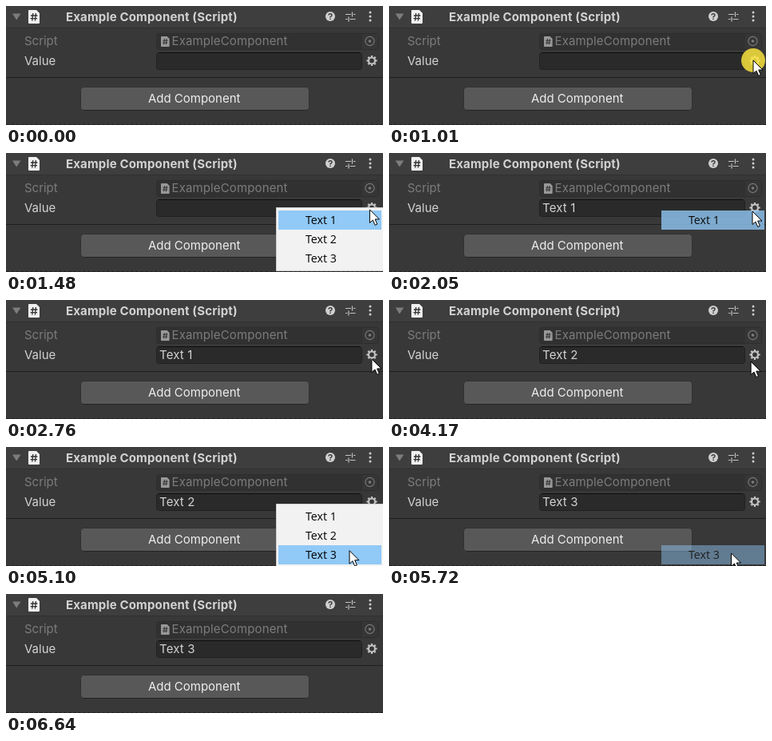
Recreate the animation shown at these times as an HTML page. Size 472 by 149 pixels, loop 7580 ms.

```html
<!DOCTYPE html>
<html lang="en">
<head>
<meta charset="utf-8">
<style>
  html, body { margin: 0; width: 100%; height: 100%; overflow: hidden; background: #383838; }
  svg { display: block; }
  text { font: 15px Inter, Roboto, sans-serif; fill: #d2d2d2; white-space: pre; }
  .title { font-weight: 700; letter-spacing: .16px; }
  .field { letter-spacing: .13px; }
  .dim { fill: #7c7c7c; }
  .button { fill: #eee; }
  #menu text { font: 14.2px "Open Sans", "Noto Sans", sans-serif; fill: #000; }
</style>
</head>
<body>
<svg width="472" height="149" viewBox="0 0 472 149">
  <defs>
    <g id="doc">
      <path d="M0 1Q0 0 1 0H10L14 4V16Q14 17 13 17H1Q0 17 0 16Z"/>
      <path d="M5.8 4L4.8 13.5M9.4 4L8.4 13.5M3 7H11.4M2.6 10.6H11" stroke="#303030" stroke-width="1.3"/>
    </g>
  </defs>

  <!-- header -->
  <rect width="472" height="149" fill="#383838"/>
  <rect width="472" height="27" fill="#3e3e3e"/>
  <path d="M0 27.5H472" stroke="#303030"/>
  <path d="M8 9.5H18.5L13.2 17.5Z" fill="#7d7d7d"/>
  <use href="#doc" x="28" y="5" fill="#f0f0f0"/>
  <text class="title" x="75" y="19">Example Component (Script)</text>
  <circle cx="406" cy="13" r="6" fill="#d0d0d0"/>
  <path d="M404 11.6Q404 9.7 406 9.7T408 11.4Q408 12.4 406 13.6V14.4M406 15.6V17" fill="none" stroke="#3e3e3e" stroke-width="1.5"/>
  <path d="M425 10.5H432M435 10.5H437.5M433.5 7.5V13.5M425 16.5H427.5M430.5 16.5H437.5M429 13.5V19.5" stroke="#c4c4c4" stroke-width="1.2"/>
  <path d="M456 8V18.5" stroke="#cfcfcf" stroke-width="3" stroke-linecap="round" stroke-dasharray="0 5"/>

  <!-- script row -->
  <text class="dim" x="23" y="49">Script</text>
  <rect x="188.5" y="34.5" width="278" height="20" rx="3" fill="#313131" stroke="#2d2d2d"/>
  <path d="M446 35H464Q466 35 466 37V52Q466 54 464 54H446Z" fill="#363636"/>
  <use href="#doc" transform="translate(194 38) scale(.76)" fill="#999"/>
  <text class="dim field" x="207.5" y="49">ExampleComponent</text>
  <circle cx="455.5" cy="44" r="5.6" fill="none" stroke="#7c7c7c" stroke-width="1.1"/>
  <circle cx="455.5" cy="44" r="1.8" fill="#7c7c7c"/>

  <!-- value row -->
  <text x="23" y="74">Value</text>
  <rect x="188.5" y="58.5" width="257" height="21" rx="3" fill="#2a2a2a" stroke="#212121"/>
  <path d="M191 58.5H443" stroke="#0d0d0d"/>
  <text id="value" class="field" x="192" y="74"></text>
  <g fill="none" stroke="#c4c4c4">
    <circle cx="458" cy="68.5" r="4" stroke-width="2.2"/>
    <circle cx="458" cy="68.5" r="5.5" stroke-width="2.2" pathLength="16" stroke-dasharray="1" stroke-dashoffset=".5"/>
  </g>

  <!-- footer -->
  <path d="M0 89.5H472" stroke="#1f1f1f"/>
  <rect x="93.5" y="101.5" width="286" height="29" rx="4" fill="#585858" stroke="#303030"/>
  <path d="M97 130.5H376" stroke="#242424"/>
  <text class="button" x="235.7" y="121" text-anchor="middle">Add Component</text>
  <path d="M0 148.5H472" stroke="#222" stroke-dasharray="4 2"/>

  <g id="menu">
    <rect id="panel" x=".5" y=".5" width="136" height="79" fill="#f2f2f2" stroke="#d0d0d0"/>
    <rect id="bar" x="3" width="129" height="24" fill="#91c9f7"/>
    <text x="37" y="21">Text 1</text>
    <text x="37" y="45">Text 2</text>
    <text x="37" y="69">Text 3</text>
  </g>
  <circle id="click" r="15" fill="#ffe83c" fill-opacity=".82"/>
  <path id="cursor" d="M0 0V16.5L3.9 13L6.7 19.4L9.4 18.2L6.7 12H12Z" fill="#fff" stroke="#000" stroke-linejoin="round"/>
</svg>
<script>
const LOOP = 7580, ENTER = 260, LEAVE = 6640;
const FADE_IN = 190, FADE_OUT = 340, ROW = 24;
const GEAR_HOLD = 110, ITEM_HOLD = 160, REST = 180;
const $ = id => document.getElementById(id);
const [menu, panel, bar, click, cursor, value] =
  ['menu', 'panel', 'bar', 'click', 'cursor', 'value'].map($);
const labels = [...menu.querySelectorAll('text')];

// each round: press the gear, then choose an item
const rounds = [
  { press: 920, gear: [456, 68], choose: 1820, item: [455, 73] },
  { press: 2860, gear: [458, 74], choose: 3480, item: [434, 110] },
  { press: 4400, gear: [457, 70.5], choose: 5380, item: [428.5, 133] }
];
for (const r of rounds) {
  r.open = r.press + GEAR_HOLD;
  r.done = r.choose + ITEM_HOLD;
}

const clamp = v => Math.max(0, Math.min(1, v));
const show = (el, on) => el.style.display = on ? '' : 'none';
const move = (el, [x, y]) => el.setAttribute('transform', `translate(${x} ${y})`);

function glide(t, t0, t1, from, to) {
  const k = Math.sin(clamp((t - t0) / (t1 - t0)) * Math.PI / 2);
  return from.map((v, i) => v + (to[i] - v) * k);
}

function pointer(t) {
  let at = [448, 142], leave = ENTER;
  for (const { press, gear, choose, item, done } of rounds) {
    // the first approach settles early, later ones run up to the press
    at = glide(t, leave, leave === ENTER ? 690 : press, at, gear);
    const arrive = choose - REST;
    const travel = 250 + 3.3 * Math.hypot(item[0] - gear[0], item[1] - gear[1]);
    if (t < arrive - travel) return at;
    at = glide(t, arrive - travel, arrive, gear, item);
    leave = done + 150;
    if (t < leave) return at;
  }
  return at;
}

function drawMenu(t, y) {
  const n = rounds.findIndex(r => t >= r.open && t < r.done + FADE_OUT);
  show(menu, n >= 0);
  if (n < 0) return;
  const { open, done, gear: [, top] } = rounds[n];
  const picked = t >= done;
  const hover = y > top ? Math.max(0, Math.floor((y - top - 4) / ROW)) : -1;
  const row = picked ? n : hover;
  move(menu, [338, Math.round(top)]);
  menu.style.opacity = picked ? 1 - (t - done) / FADE_OUT : clamp((t - open) / FADE_IN);
  // after a choice only the chosen row lingers
  show(panel, !picked);
  labels.forEach((el, i) => show(el, !picked || i === n));
  show(bar, row >= 0);
  bar.setAttribute('y', 4 + ROW * row);
}

function draw(t) {
  const at = pointer(t);
  show(cursor, t >= ENTER && t < LEAVE);
  move(cursor, at);
  move(click, at);
  show(click, rounds.some(r => t >= r.press && t < r.open || t >= r.choose && t < r.done));
  drawMenu(t, at[1]);
  const chosen = rounds.filter(r => t >= r.done + 50).length;
  value.textContent = chosen ? 'Text ' + chosen : '';
}

const start = performance.now();
function tick() {
  draw((performance.now() - start) % LOOP);
  requestAnimationFrame(tick);
}
tick();
</script>
</body>
</html>
```
